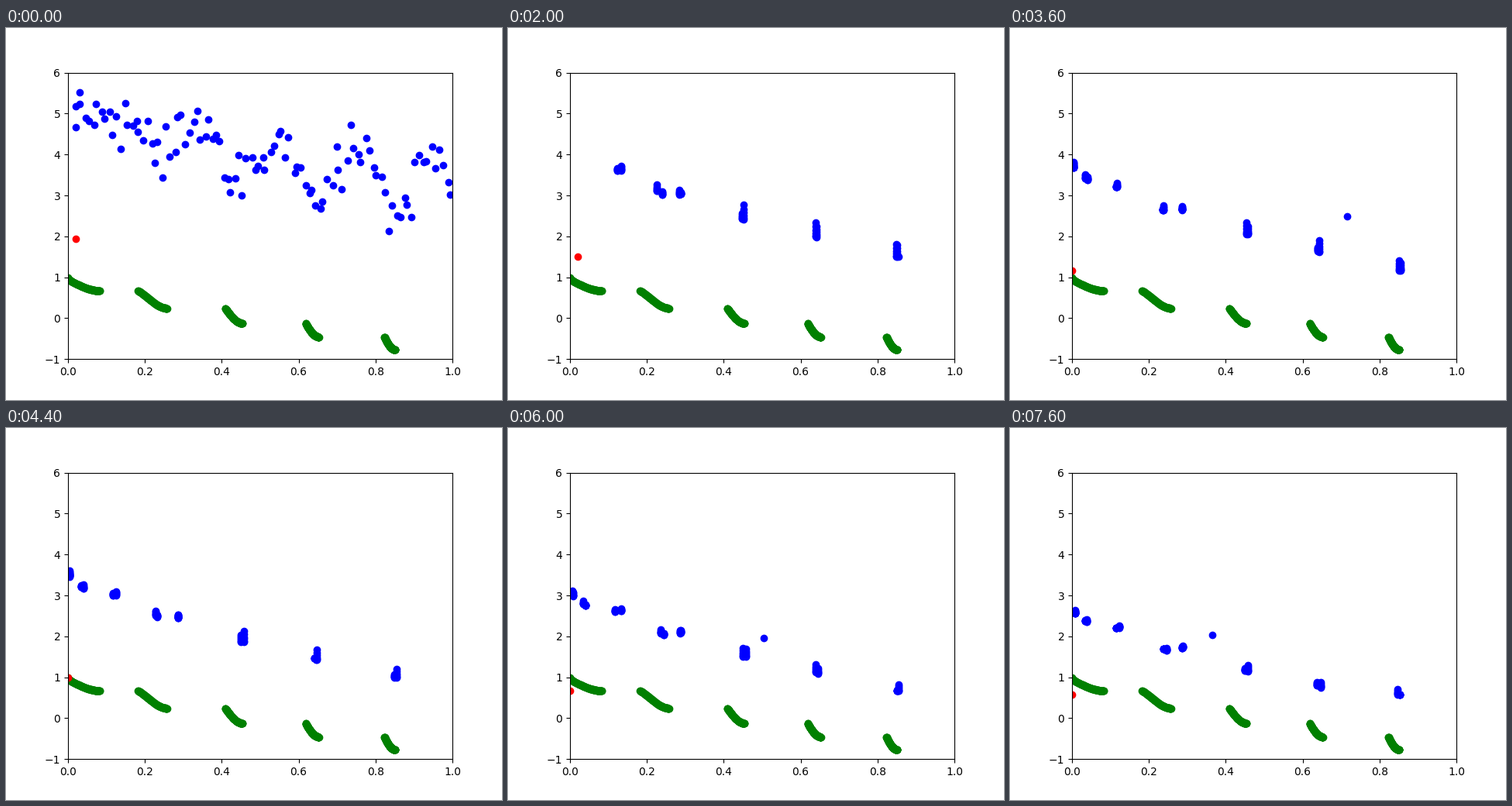
Animation, 640 px wide and 480 px high, one loop 8000 ms. Source, as a matplotlib script:

```python
import numpy as np
import matplotlib.pyplot as plt
from matplotlib.animation import FuncAnimation

FRAMES, INTERVAL = 20, 400
POPULATION = 100
BEST_X = 0.85      # where the second objective is smallest
STALLED_G = 3.03   # the rightmost basin stops improving here

# Basins of the front: centre, spread of its columns, column height,
# first generation in which it is occupied.
BASINS = [
    (0.006, 0.003, 0.20, 6),
    (0.040, 0.006, 0.15, 8),
    (0.125, 0.012, 0.15, 1),
    (0.235, 0.010, 0.20, 1),
    (0.286, 0.003, 0.15, 1),
    (0.452, 0.007, 0.50, 1),
    (0.644, 0.007, 0.50, 1),
    (BEST_X, 0.005, 0.45, 1),
]


def second_objective(x, g):
    """ZDT3: g = 1 gives the optimal front."""
    return g - np.sqrt(x * g) - x * np.sin(10 * np.pi * x)


def best_g(n):
    return 4.8 - 0.11 * n


def survivors(n):
    """Random first generation, of which only the fittest last."""
    rng = np.random.default_rng(4)
    x = (np.arange(POPULATION) + rng.random(POPULATION)) / POPULATION
    x = np.clip(x, 0.02, 0.993)
    g = np.clip(rng.normal(5.45, 0.45, POPULATION), 4.75, 6.4)
    keep = g < (5.3 - 0.25 * n if n else np.inf)
    return x[keep], g[keep]


def columns(n):
    """Vertical stacks in each basin, resettled every four generations."""
    rng = np.random.default_rng((n + 1) // 4)
    shrink = 1 - n / 30
    xs, gs = [], []
    for centre, spread, height, start in BASINS:
        offsets = spread * rng.uniform(-1, 1, 2)
        heights = height * shrink * np.array([1, rng.random()])
        if n < start:
            continue
        floor = best_g(n)
        if centre == BEST_X:
            floor = max(floor, STALLED_G)
        for offset, top in zip(offsets, heights):
            steps = np.linspace(0, 1, 6) ** 1.5
            xs.extend([centre + offset] * len(steps))
            gs.extend(floor + top * steps)
    return np.array(xs), np.array(gs)


def population(n):
    x, g = survivors(n)
    if n:
        column_x, column_g = columns(n)
        stray_x = 1.03 - 0.035 * n
        x = np.concatenate([x, column_x, [stray_x]])
        g = np.concatenate([g, column_g, [best_g(n)]])
    return x, second_objective(x, g)


def ideal_point(n):
    best = second_objective(BEST_X, max(best_g(n), STALLED_G))
    return [0.02 if n < 6 else 0], [best]


fig, ax = plt.subplots(figsize=(6.4, 4.8), dpi=100)
ax.set_xlim(0, 1)
ax.set_ylim(-1, 6)

blue, = ax.plot([], [], "o", color="blue")
segments = [(0, 0.083), (0.1823, 0.2578), (0.4093, 0.4539),
            (0.6184, 0.6525), (0.8233, 0.8518)]
front_x = np.concatenate([np.linspace(a, b, 100) for a, b in segments])
ax.plot(front_x, second_objective(front_x, 1), "o", color="green")
red, = ax.plot([], [], "o", color="red")


def update(n):
    blue.set_data(*population(n))
    red.set_data(*ideal_point(n))
    return blue, red


anim = FuncAnimation(fig, update, frames=FRAMES, interval=INTERVAL, repeat=True)
plt.show()
```
